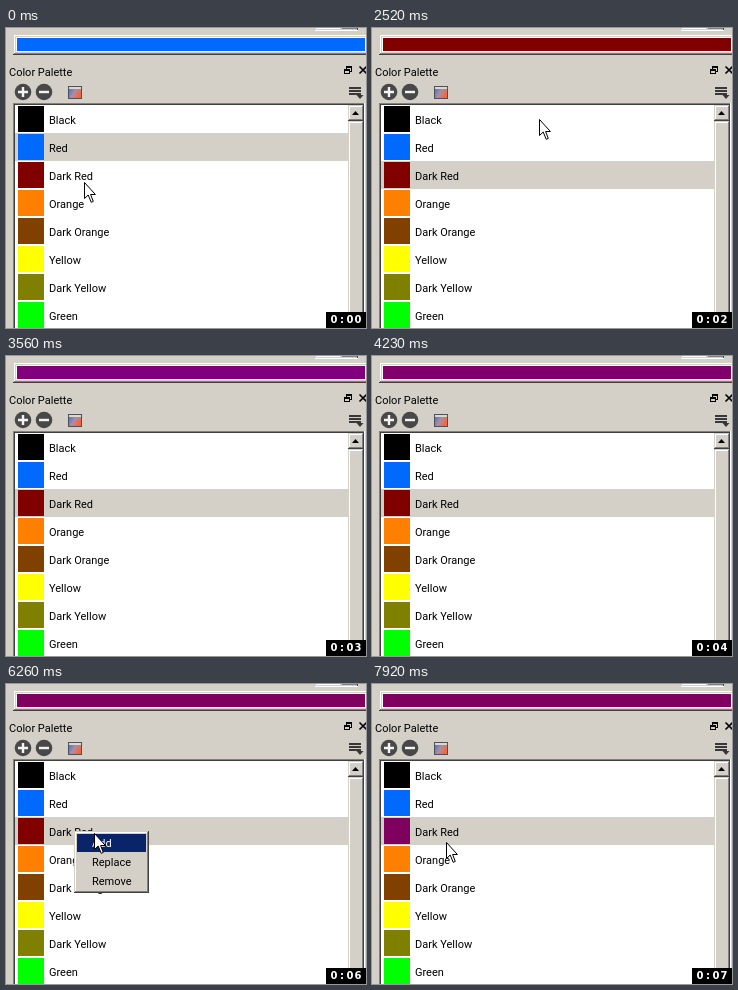
An HTML page for the animation above (8000 ms loop, 360 px wide and 300 px high).

```html
<!DOCTYPE html>
<html lang="en">
<head>
<meta charset="utf-8">
<title>Color Palette</title>
<style>
  html, body { margin: 0; width: 100%; height: 100%; overflow: hidden; background: #d4d0c8; }
  svg { display: block; width: 360px; height: 300px; }
  text { font: 11px Roboto, "Open Sans", sans-serif; white-space: pre; }
  .clock { font: bold 10px "DejaVu Sans", sans-serif; text-anchor: middle; fill: #fff; }
  rect { shape-rendering: crispEdges; }
</style>
</head>
<body>
<svg id="stage" viewBox="0 0 360 300">
  <defs>
    <linearGradient id="spectrum" x2="1" y2=".4">
      <stop offset="0" stop-color="#3c78d8"/>
      <stop offset=".5" stop-color="#b08ca0"/>
      <stop offset="1" stop-color="#f06840"/>
    </linearGradient>
  </defs>
</svg>
<script>
const LOOP = 8000, STEP = 60;
const FACE = '#d4d0c8', SHADE = '#808080', DARK = '#404040', NAVY = '#0a246a';
const BLUE = '#006aff', MAROON = '#800000', PLUM = '#800060';
const stage = document.getElementById('stage');

function add(tag, attrs, parent = stage) {
  const el = document.createElementNS('http://www.w3.org/2000/svg', tag);
  for (const key in attrs) el.setAttribute(key, attrs[key]);
  parent.append(el);
  return el;
}
const box = (x, y, width, height, fill, parent) => add('rect', { x, y, width, height, fill }, parent);
const path = (d, attrs, parent) => add('path', { d, fill: 'none', ...attrs }, parent);
function label(x, y, words, parent) {
  const el = add('text', { x, y }, parent);
  el.textContent = words;
  return el;
}
// Raised panel: light top and left, dark bottom and right.
function raised(x, y, w, h, parent) {
  box(x, y, w, h, DARK, parent);
  box(x, y, w - 1, h - 1, FACE, parent);
  box(x + 1, y + 1, w - 2, h - 2, SHADE, parent);
  box(x + 1, y + 1, w - 3, h - 3, '#fff', parent);
  box(x + 2, y + 2, w - 4, h - 4, FACE, parent);
}

// Controls cut off by the top edge
box(0, 0, 360, 300, FACE);
box(310, 0, 24, 1, '#fff');
box(336, 0, 15, 1, SHADE);
box(351, 0, 1, 2, DARK);
box(309, 2, 43, 1, '#fff');

// Colour bar
raised(7, 6, 356, 21);
box(10, 9, 350, 15, '#fff');
const bar = box(11, 10, 348, 13, BLUE);

// Panel title and toolbar
label(3, 48, 'Color Palette');
box(340, 38, 6, 6, '#000'); box(341, 40, 4, 3, FACE);
box(338, 41, 6, 5, '#000'); box(339, 43, 4, 2, FACE);
path('M353.5 38.5l7 7M360.5 38.5l-7 7', { stroke: '#000', 'stroke-width': 1.6 });
for (const [cx, sign] of [[17, 'M12 64h10M17 59v10'], [38, 'M33 64h10']]) {
  add('circle', { cx, cy: 64, r: 8.3, fill: '#484848' });
  path(sign, { stroke: '#f4f4f4', 'stroke-width': 2.4 });
}
box(62, 58, 14, 13, '#505058');
box(63, 59, 12, 2, '#d8d8d8');
box(63, 61, 12, 9, 'url(#spectrum)');
for (const y of [59, 62, 65]) box(343, y, 12, 2, '#383838');
path('M350.5 67h7l-3.5 4z', { fill: '#383838' });

// List
box(7, 75, 352, 225, SHADE);
box(8, 76, 350, 224, DARK);
box(358, 75, 1, 225, '#fff');
box(9, 77, 333, 223, '#fff');
const selection = box(9, 105, 333, 28, FACE);
const swatches = [
  ['Black', '#000'], ['Red', BLUE], ['Dark Red', MAROON], ['Orange', '#ff8000'],
  ['Dark Orange', '#804000'], ['Yellow', '#ff0'], ['Dark Yellow', '#808000'], ['Green', '#0f0'],
].map(([name, color], i) => {
  label(43, 96 + 28 * i, name);
  return box(12, 78 + 28 * i, 26, 26, color);
});

// Scrollbar
raised(342, 77, 16, 16);
path('M346 87h7l-3.5-4z', { fill: '#000' });
raised(342, 93, 16, 210);

// Context menu
const menu = add('g', {});
raised(68, 147, 75, 62, menu);
const highlight = box(71, 150, 69, 18, NAVY, menu);
const items = ['Add', 'Replace', 'Remove'].map((name, i) => label(86, 163 + 19 * i, name, menu));

// Clock
box(320, 284, 40, 16, '#000');
const clock = add('text', { class: 'clock', x: '328 336 344 352', y: 295 });

// Pointer
const pointer = add('g', {});
const ring = add('circle', { cx: 1.5, cy: 2, r: 10.5, fill: 'none', stroke: '#000' }, pointer);
path('M.5 .5V16.5L4.2 13 7.2 20.3 9.3 19.4 6.6 12.5H11.4Z', { fill: '#fff', stroke: '#000' }, pointer);

// Pointer strokes; each sets out from where the last one ended.
// The powers bend the path: below 1 slows down, above 1 speeds up.
const strokes = [
  { start: 0, end: 180, to: [71, 150] },
  { start: 1230, end: 1290, to: [71, 146] },
  { start: 2280, end: 2580, to: [186, 17], power: [0.8, 3.8] },
  { start: 4990, end: 5290, from: [330, 90], to: [65, 143], power: [0.5, 0.7] },
  { start: 5290, end: 5470, to: [69, 148] },
  { start: 6020, end: 6560, to: [140, 170], power: [1.6, 3.8] },
  { start: 6560, end: 6920, to: [131, 175] },
  { start: 7800, end: 7920, to: [74, 158] },
];
strokes.reduce((from, stroke) => (stroke.from ??= from, stroke.to), [78, 154]);

const HIDE = 2640, REAPPEAR = 5050;
const PICK = 1780, MENU_OPEN = 5840, MENU_CLOSE = 7360;
const clicks = [PICK, MENU_OPEN, MENU_CLOSE].map(t => t - STEP);

function progress(t, start, end) {
  const stepped = Math.floor((t - start) / STEP) * STEP;
  return Math.max(0, Math.min(1, stepped / (end - start)));
}
function pointerAt(t) {
  const { start, end, from, to, power = [1, 1] } = strokes.findLast(s => s.start <= t);
  const p = progress(t, start, end);
  return from.map((a, i) => Math.round(a + (to[i] - a) * p ** power[i]));
}
function barColor(t) {
  if (t < PICK) return BLUE;
  const rise = 1 - (1 - progress(t, 3320, 3680)) ** 3;
  return `rgb(128 0 ${128 * rise - 32 * progress(t, 4110, 4290)})`;
}
const show = (el, on) => el.setAttribute('visibility', on ? 'visible' : 'hidden');

function draw(t) {
  const [x, y] = pointerAt(t);
  show(pointer, t < HIDE || t >= REAPPEAR);
  pointer.setAttribute('transform', `translate(${x} ${y})`);
  ring.setAttribute('opacity', clicks.some(c => t >= c && t < c + STEP) ? 1 : 0);

  bar.setAttribute('fill', barColor(t));
  selection.setAttribute('y', t < PICK ? 105 : 133);
  swatches[2].setAttribute('fill', t < MENU_CLOSE ? MAROON : PLUM);

  const open = t >= MENU_OPEN && t < MENU_CLOSE;
  const hovered = !open || y < 149 ? -1 : y < 168 ? 0 : 1;
  show(menu, open);
  show(highlight, hovered >= 0);
  highlight.setAttribute('y', 150 + 19 * Math.max(0, hovered));
  items.forEach((item, i) => item.setAttribute('fill', i === hovered ? '#fff' : '#000'));

  clock.textContent = '0:0' + Math.min(7, Math.floor(t / 980));
}

const begin = performance.now();
function tick() {
  draw((performance.now() - begin) % LOOP);
  requestAnimationFrame(tick);
}
draw(0);
requestAnimationFrame(tick);
</script>
</body>
</html>
```
